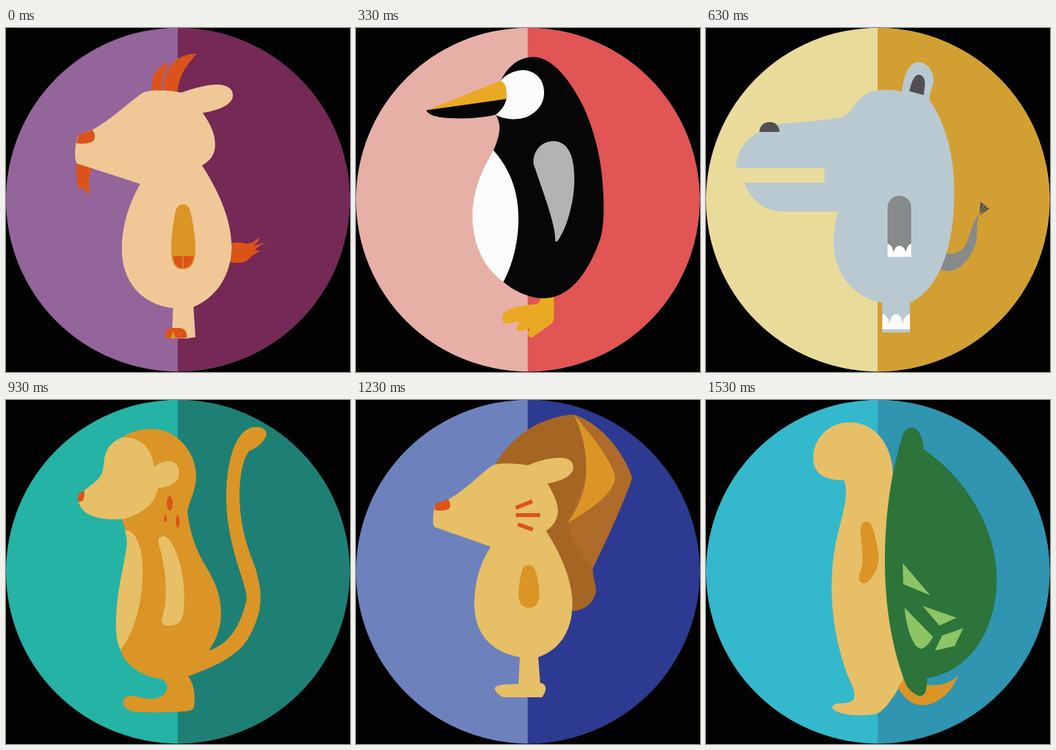
An HTML page for the animation above (1830 ms loop, 523 px wide and 523 px high).

```html
<!DOCTYPE html>
<html lang="en">
<head>
<meta charset="utf-8">
<title>Animals</title>
<style>
html, body { margin: 0; width: 100%; height: 100%; overflow: hidden; background: #020202; }
svg { display: block; width: 100%; height: 100%; }
.card { visibility: hidden; animation: show 1830ms step-end infinite; animation-delay: calc(var(--at) - 1830ms); }
.first { animation-name: show-first; }
/* 300 ms and 330 ms of the 1830 ms loop */
@keyframes show { 0% { visibility: visible; } 16.3934%, 100% { visibility: hidden; } }
@keyframes show-first { 0% { visibility: visible; } 18.0328%, 100% { visibility: hidden; } }

.orange { fill: #dc5319; }
.gold { fill: #da9526; }
.sand { fill: #e6bf66; }
.cream { fill: #f0c898; }
.white { fill: #fbfbfb; }
.black { fill: #060606; }
.yellow { fill: #eaa922; }
.blue { fill: #b9c9d2; }
.grey { fill: #878a8b; }
.dark { fill: #505054; }
.green { fill: #2c743a; }
.lime { fill: #8cc466; }
</style>
</head>
<body>
<svg viewBox="0 0 523 523">
<defs>
  <clipPath id="disc"><circle cx="261.25" cy="261" r="261.25"/></clipPath>
  <g id="disc-halves" clip-path="url(#disc)">
    <rect width="523" height="523" style="fill:var(--left)"/>
    <rect x="261" width="262" height="523" style="fill:var(--right)"/>
  </g>
</defs>

<!-- goat -->
<g class="card first" style="--at:0ms;--left:#94659a;--right:#752957">
  <use href="#disc-halves"/>
  <g class="orange">
    <path d="M222 97C220 75 228 58 249 52C240 65 237 80 237 97Z"/>
    <path d="M239 97C240 62 258 39 290 39C275 55 261 75 261 99Z"/>
    <path d="M340 328C352 324 361 327 367 328C374 327 380 323 386 318C384 324 380 328 376 331C383 330 390 327 396 324L378 337L386 339C376 345 374 346 370 351C363 358 352 358 340 356Z"/>
    <path d="M108 203L131 212C125 225 125 240 129 256L121 245L119 250L115 241L111 245C107 235 106 215 108 203Z"/>
  </g>
  <path class="cream" d="M131 155C160 139 185 115 204 101C212 95 225 95 235 95C250 95 260 97 267 98C285 92 305 86 320 86C337 86 345 93 345 102C345 116 325 125 299 129C310 145 318 160 318 177C318 195 308 203 298 209C325 250 343 295 343 332C343 375 320 410 285 424L288 470L274 472H252L254 426C205 420 176 385 176 335C176 300 188 265 204 237L108 206C105 202 105 195 105 190C105 180 107 170 110 162Z"/>
  <g class="orange">
    <path d="M110 162L131 155C135 159 136 165 134 170C130 176 115 177 107 175Z"/>
    <path d="M243 472C241 462 243 456 252 456H264C272 457 275 461 275 471Z"/>
  </g>
  <path class="gold" d="M250 472L254 460L258 472ZM269 268C277 268 280 275 281 282C285 300 288 318 288 335C288 355 283 367 269 367C255 367 251 355 251 335C251 318 254 300 257 282C259 273 262 268 269 268Z"/>
  <path class="orange" d="M254 347H285C284 358 279 365 269 365C259 365 255 358 254 347Z"/>
  <path d="M269 347V365" stroke="#da9526" stroke-width="1.5"/>
</g>

<!-- penguin -->
<g class="card" style="--at:330ms;--left:#e6b0a6;--right:#e15554">
  <use href="#disc-halves"/>
  <path class="yellow" d="M281 406H301V438C301 446 298 450 294 452L268 470C263 471 261 468 261 462L265 456C258 459 252 461 246 460C243 458 244 453 249 446C240 448 232 449 225 449C221 444 221 436 226 432C240 424 255 421 274 420C279 418 280 414 281 406Z"/>
  <path class="black" d="M220 80C232 56 250 44 270 44C300 45 326 80 346 120C370 174 377 225 376.500 280C376 300 374 312 371.500 320C352 377 322 411 285 411C265 411 240 400 224 386L209 186C215 172 219 160 218 148C217 140 215 136 212 131Z"/>
  <g class="white">
    <path d="M220 80C230 68 245 64 254 64C275 65 286 80 286 98C286 115 276 127 262 134C250 140 230 141 212 132C222 125 228 115 229 105Z"/>
    <path d="M209 186C235 215 247 250 247 290C247 325 238 360 224 386C195 365 177 330 177 285C177 245 195 210 209 186Z"/>
  </g>
  <path class="yellow" d="M107 125L218 81C225 80 230 88 229 108Z"/>
  <path class="black" d="M107 125L228 108C224 118 218 126 212 132C185 138 160 138 140 137C125 136 110 133 107 125Z"/>
  <path fill="#b3b3b3" d="M300 172C320 172 332 190 332 230C332 265 320 305 307 323C305 326 303 325 303 323C303 300 290 265 270 207C268 190 280 172 300 172Z"/>
</g>

<!-- hippo -->
<g class="card" style="--at:630ms;--left:#e9db9a;--right:#d2a032">
  <use href="#disc-halves"/>
  <path class="grey" d="M360 343C382 345 392 339 398 322C403 307 406 293 415 284C411 300 412 315 411 325C405 345 390 368 370 369.500C362 370 358 368 354 366Z"/>
  <path class="dark" d="M415.500 285L417.500 264L430.500 275Z"/>
  <path d="M416 284L423 267M416 284L428 271" stroke="#d2a032" stroke-width=".8"/>
  <path class="blue" d="M46 213C46 190 58 170 81 158L110 146C140 143 180 141 208 135C230 128 222 94 275 94C285 94 292 95 298 97C300 75 308 52 322 52C338 52 347 68 346 82C344 92 339 100 340 110C365 146 377.500 195 377.500 250C377.500 315 363 392 310 418V463H268V418C220 408 194 370 194 325C194 310 197 292 201 279H115C90 279 68 262 58 235H180V213Z"/>
  <g class="dark">
    <path d="M81 158C82 148 88 143 97 143C106 143 111 149 112 158Z"/>
    <path d="M309 96C313 80 317 71 323 71C330 71 333 78 333 85L331 102Z"/>
  </g>
  <path class="grey" d="M276 348V273a18 18 0 0 1 36 0V348Z"/>
  <g class="white">
    <path d="M276 328Q283 329 285 341Q288 331 294 331Q301 331 304 341Q306 329 312 328V348H276Z"/>
    <path d="M268 435Q276 436 279 449Q282 435 289 435Q296 435 299 449Q302 435 310 435V458H268Z"/>
  </g>
</g>

<!-- monkey -->
<g class="card" style="--at:930ms;--left:#24b3a5;--right:#1e8074">
  <use href="#disc-halves"/>
  <path class="gold" d="M176 57C195 45 210 44 222 44C260 44 289 80 289 115C289 140 277 155 276 172C280 205 290 230 305 255C320 280 327 300 327 325C327 345 320 365 308 381C340 372 358 340 366 302C366 280 335 220 335 150C335 90 350 41 380 41C390 41 397 45 396 54C390 66 380 74 370 77C360 90 355 115 355 150C357 200 368 225 379 255C388 285 389 305 384 325C378 345 370 362 360 374C340 395 310 408 277 420C286 432 288 448 286 466C285 471 280 472 275 473C240 476 220 475 195 474C182 471 177 465 178 458C180 450 188 449 195 450C215 455 225 455 230 453C240 450 245 443 245 436C244 429 240 425 235 424C200 418 180 400 174 380L184 218C184 205 179 190 175 178Z"/>
  <g class="sand">
    <path d="M181 198C197 196 208 225 208 260C208 305 195 355 174 380C167 365 166 345 168 320C170 285 180 250 184 218C184 210 182 203 181 198Z"/>
    <path d="M176 57C200 55 222 70 225 102C235 93 248 91 256 95C264 101 264 113 262 119C255 130 242 133 231 134C228 155 210 172 180 181C150 183 115 180 110 153L118 138C140 122 145 118 148 103C150 85 150 68 176 57Z"/>
    <path d="M240 207C255 210 271 255 271 300C271 330 268 343 248 343C238 343 236 337 237 331C247 305 244 260 233 222C230 213 232 207 240 207Z"/>
  </g>
  <g class="orange">
    <path d="M119 138C113 138 108 145 109 153C111 156 115 155 117 152C119 148 120 142 119 138Z"/>
    <ellipse cx="249" cy="157" rx="4.5" ry="11"/>
    <ellipse cx="242.3" cy="180" rx="2" ry="5.5"/>
    <ellipse cx="261" cy="184.5" rx="2.7" ry="10"/>
  </g>
</g>

<!-- squirrel -->
<g class="card" style="--at:1230ms;--left:#6d82bd;--right:#2c3a91">
  <use href="#disc-halves"/>
  <path fill="#a56523" d="M212 97C240 50 285 25 331 22L350 105L322 187L360 255C360 270 365 280 365 290C362 310 345 320 330 321L270 200Z"/>
  <path fill="#ae6b29" d="M331 22C370 35 405 75 420 118C410 150 380 215 360 256C340 230 325 210 322 187Z"/>
  <path fill="#a56523" d="M331 22L360 90L322 187L300 110Z"/>
  <path class="gold" d="M331 22C350 45 390 90 394 118C392 145 350 170 322 187C340 160 350 135 350 105C350 75 343 45 331 22Z"/>
  <path class="sand" d="M141 151C165 137 190 112 205 101C215 95 235 96 262 99C290 87 310 87 320 89C330 92 333 103 328 110C322 119 305 125 291 127C302 145 307 158 307 168C307 183 298 193 289 199C312 235 329 275 329 310C329 350 310 380 277 391L280 430C288 431 290 438 287 445L283 452H225C218 450 211 443 211 438C213 433 225 432 247 432L249 391C205 383 180 355 180 310C180 275 190 245 205 223L119 193C116 188 117 175 119 163Z"/>
  <path class="orange" d="M121 157L140 151C144 156 144 161 142 165C136 169 125 169 119 167Z"/>
  <path d="M243 164L268 154M243 175H280M246 189L269 197" stroke="#dc5319" stroke-width="6"/>
  <path class="gold" d="M262 251C272 251 274 262 276 272C280 290 282 316 263 316C243 316 246 290 250 270C252 258 254 251 262 251Z"/>
</g>

<!-- turtle -->
<g class="card" style="--at:1530ms;--left:#34b8cc;--right:#2f95b0">
  <use href="#disc-halves"/>
  <path class="sand" d="M218 34C185 34 163 60 163 88C163 112 180 122 210 122C216 140 211 160 205 185C193 230 191 255 191 290C192 345 205 395 219 427C224 437 228 448 224 456C215 465 195 457 192 467C193 477 230 483 260 477C275 470 288 445 300 428L284 120C286 70 258 34 218 34Z"/>
  <path class="gold" d="M292 437L301 424L336 433C355 435 370 432 383 419C375 445 350 464 330 464C312 464 300 452 292 437Z"/>
  <path class="green" d="M299 53C302 44 308 42 314 42C325 44 330 60 331 75C400 122 442 200 442 272C442 345 405 412 336 423C336 440 334 450 325 450C315 448 306 437 304 432C285 385 272 320 272 245C272 180 280 115 299 53Z"/>
  <path class="gold" d="M243 185C252 185 253 193 255 200C262 230 266 240 258 260C250 275 243 280 238 279C231 276 232 268 235 260C241 245 236 220 235 200C235 190 238 185 243 185Z"/>
  <path class="lime" d="M299 248L341 297L300 280ZM329 313L381 331L355 343ZM302 316L345 360C340 370 333 378 326 378C312 375 303 335 302 316ZM359 358L391 347L378 374L348 381Z"/>
</g>
</svg>
</body>
</html>
```
